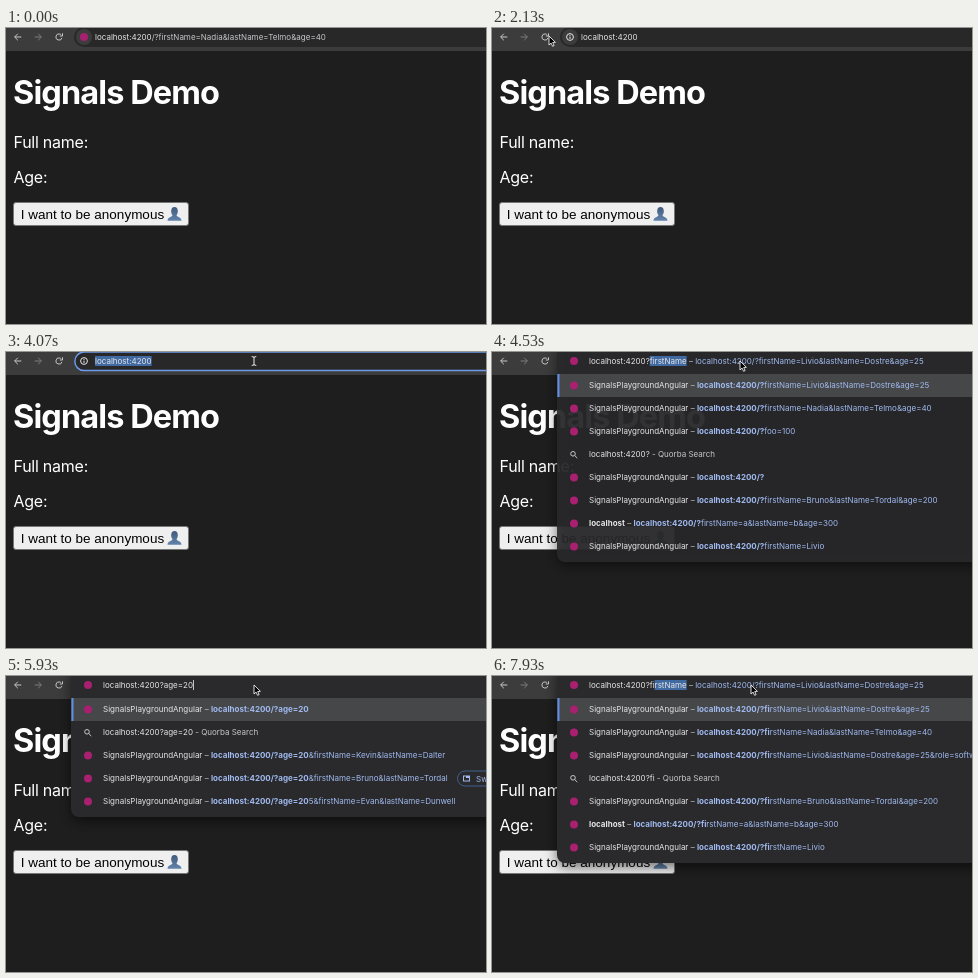
Animation, 480 px wide and 296 px high, one loop 8 s. Source, as an HTML page with a canvas:

```html
<!DOCTYPE html>
<html lang="en">
<head>
<meta charset="utf-8">
<title>Signals Demo</title>
<style>
html, body { margin: 0; width: 100%; height: 100%; overflow: hidden; background: #1e1e1e; }
canvas { display: block; width: 480px; height: 296px; }
</style>
</head>
<body>
<canvas id="stage"></canvas>
<script>
const W = 480, H = 296, LOOP = 8000, TICK = 200 / 3;
const canvas = document.getElementById('stage');
const ctx = canvas.getContext('2d');
const dpr = window.devicePixelRatio || 1;
canvas.width = W * dpr;
canvas.height = H * dpr;

const UI = 'Inter, "Open Sans", sans-serif';
const SMALL = '8px ' + UI, SMALL_BOLD = '700 8px ' + UI;
const WHITE = '#e6e6e6', DIM = '#c6c7c9', BLUE = '#a0baf0', ICON = '#c8c8c8', CARET = '#c4c4c4';
const BAR = '#3c3c3c', PILL = '#282829', POPUP = '#2a2a2c', SELECT = '#426aa2', LOGO = '#a8206f';

const HOST = 'localhost:4200';
const person = (first, last) => `firstName=${first}&lastName=${last}`;
const LIVIO = person('Livio', 'Dostre') + '&age=25';
const NADIA = person('Nadia', 'Telmo') + '&age=40';
const BRUNO = person('Bruno', 'Tordal');
const KEVIN = person('Kevin', 'Dalter');
const EVAN = person('Evan', 'Dunwell');
const AB = '@' + person('a', 'b') + '&age=300';

// Suggestion rows: "*" is a web search, "@" a page titled by its host, "!" an open tab
const ANY = [LIVIO, NADIA, 'foo=100', '*', '', BRUNO + '&age=200', AB, 'firstName=Livio'];
const FIRST = [LIVIO, NADIA, LIVIO + '&role=software', '*', BRUNO + '&age=200', AB, 'firstName=Livio'];
const AGE_A = ['age=20', '*', 'age=205&' + EVAN, 'age=20&' + KEVIN];
const AGE_B = ['age=20', '*', 'age=20&' + KEVIN, 'age=205&' + EVAN];
const AGE_20 = ['age=20', '*', 'age=20&' + KEVIN, '!age=20&' + BRUNO, 'age=205&' + EVAN];

// Address bar states: url with focus and selection, or typed query with suggestions
const STATES = [
  { t: 0, url: HOST + '/?' + NADIA, logo: true },
  { t: 1130, url: HOST + '/?' + NADIA, logo: true, focus: true, all: true },
  { t: 2130, url: HOST },
  { t: 3870, url: HOST, focus: true, all: true },
  { t: 4130, url: HOST, focus: true },
  { t: 4530, typed: '', rest: 'firstName', tail: LIVIO, rows: ANY, alpha: 0.9 },
  { t: 4600, typed: '', rest: 'firstName', tail: LIVIO, rows: ANY },
  { t: 4870, typed: 'a', rest: 'ge=20', rows: AGE_A },
  { t: 5000, typed: 'ag', rest: 'e=20', rows: AGE_A },
  { t: 5130, typed: 'age', rest: '=20', rows: AGE_A },
  { t: 5330, typed: 'age=', rest: '20', rows: AGE_A },
  { t: 5470, typed: 'age=', rest: '20', rows: AGE_B },
  { t: 5670, typed: 'age=2', rest: '0', rows: AGE_B },
  { t: 5870, typed: 'age=20', rest: '', rows: AGE_20 },
  { t: 6130, url: HOST, loading: true },
  { t: 6200, url: HOST },
  { t: 6730, url: HOST, focus: true, all: true },
  { t: 7000, url: HOST, focus: true },
  { t: 7470, typed: '', rest: 'firstName', tail: LIVIO, rows: ANY, alpha: 0.9 },
  { t: 7530, typed: '', rest: 'firstName', tail: LIVIO, rows: ANY },
  { t: 7670, typed: 'f', rest: 'irstName', tail: LIVIO, rows: FIRST },
  { t: 7800, typed: 'fi', rest: 'rstName', tail: LIVIO, rows: FIRST }
];

// Pointer path: time, x, y
const PATH = [
  [67, 344, 129], [200, 394, 161], [333, 394, 161], [600, 372, 178], [1000, 309, 9],
  [1200, 309, 9], [1400, 78, 23], [1600, 74, 20], [2067, 57, 8], [2467, 57, 8],
  [2733, 120, 55], [3000, 207, 19], [3133, 207, 19], [3200, 221, 20], [3267, 227, 20],
  [3400, 227, 20], [3667, 248, 9], [6800, 248, 9], [7133, 259, 9]
];

function pointerAt(t) {
  if (t < PATH[0][0] - 1) return null;
  const i = PATH.findIndex(p => p[0] > t);
  if (i < 1) return PATH[i < 0 ? PATH.length - 1 : 0].slice(1);
  const [t0, x0, y0] = PATH[i - 1], [t1, x1, y1] = PATH[i];
  const k = (t - t0) / (t1 - t0), e = k * k * (3 - 2 * k);
  return [x0 + (x1 - x0) * e, y0 + (y1 - y0) * e];
}

function text(str, x, y, color, font = SMALL, spacing = 0) {
  ctx.font = font;
  ctx.letterSpacing = spacing + 'px';
  ctx.fillStyle = color;
  ctx.fillText(str, x, y);
  return x + ctx.measureText(str).width;
}

function widthOf(str) {
  ctx.font = SMALL;
  ctx.letterSpacing = '0px';
  return ctx.measureText(str).width;
}

function rect(x, y, w, h, color) {
  ctx.fillStyle = color;
  ctx.fillRect(x, y, w, h);
}

function roundRect(x, y, w, h, r) {
  ctx.beginPath();
  ctx.roundRect(x, y, w, h, r);
}

function disc(x, y, r, color) {
  ctx.beginPath();
  ctx.arc(x, y, r, 0, Math.PI * 2);
  ctx.fillStyle = color;
  ctx.fill();
}

function line(points, color, width = 1) {
  ctx.beginPath();
  points.forEach(([x, y]) => ctx.lineTo(x, y));
  ctx.strokeStyle = color;
  ctx.lineWidth = width;
  ctx.stroke();
}

function ring(x, y, r, color, from = 0, to = Math.PI * 2) {
  ctx.beginPath();
  ctx.arc(x, y, r, from, to);
  ctx.strokeStyle = color;
  ctx.lineWidth = 1;
  ctx.stroke();
}

function drawCaret(x) {
  rect(Math.round(x), 4, 1, 10, CARET);
}

function drawPage() {
  rect(0, 0, W, H, '#1e1e1e');
  text('Signals Demo', 7, 76, '#fff', '700 32.5px ' + UI, -0.9);
  text('Full name:', 7.5, 120, '#fff', '16px ' + UI, -0.25);
  text('Age:', 7.5, 155, '#fff', '16px ' + UI, -0.25);

  roundRect(7.5, 174.5, 175, 23, 2.5);
  ctx.fillStyle = '#efefef';
  ctx.fill();
  ctx.strokeStyle = '#777';
  ctx.lineWidth = 1;
  ctx.stroke();
  text('I want to be anonymous', 14.8, 190.5, '#000', '13.5px "Liberation Sans", Arial, sans-serif');
  drawBust(168.5, 178.7);
}

function drawBust(x, y) {
  const fill = ctx.createLinearGradient(0, y, 0, y + 14);
  fill.addColorStop(0, '#40587a');
  fill.addColorStop(1, '#6384ad');
  ctx.fillStyle = fill;
  ctx.beginPath();
  ctx.ellipse(x, y + 4.6, 3.3, 4.3, 0, 0, Math.PI * 2);
  ctx.fill();
  ctx.beginPath();
  ctx.moveTo(x - 7, y + 14);
  ctx.bezierCurveTo(x - 7, y + 10, x - 2, y + 11, x - 1.7, y + 7.5);
  ctx.lineTo(x + 1.7, y + 7.5);
  ctx.bezierCurveTo(x + 2, y + 11, x + 7, y + 10, x + 7, y + 14);
  ctx.fill();
}

function drawArrowIcon(x, dir, color) {
  line([[x - 3.3 * dir, 9], [x + 3.3 * dir, 9]], color);
  line([[x + 0.2 * dir, 5.8], [x + 3.4 * dir, 9], [x + 0.2 * dir, 12.2]], color);
}

function drawReload(hover, loading) {
  if (hover) disc(53, 9, 9, '#505050');
  if (loading) {
    line([[50, 6], [56, 12]], ICON);
    line([[56, 6], [50, 12]], ICON);
    return;
  }
  ring(53, 9, 3.1, ICON, 0.3, Math.PI * 2 - 0.8);
  line([[56.5, 5.3], [56.5, 8], [53.8, 8]], ICON);
}

function drawToolbar(s, hover) {
  rect(0, 0, W, 23, BAR);
  drawArrowIcon(12, -1, ICON);
  drawArrowIcon(32, 1, '#7c7c7c');
  drawReload(hover, s.loading);
}

function drawAddress(s) {
  roundRect(68, -1, 440, 20, 10);
  ctx.fillStyle = PILL;
  ctx.fill();
  if (s.focus) {
    roundRect(68.8, 0, 440, 18.6, 9.3);
    ctx.strokeStyle = '#6c9bea';
    ctx.lineWidth = 1.5;
    ctx.stroke();
  } else {
    disc(78, 9, 8, BAR);
  }
  if (s.logo) disc(78, 9, 4, LOGO);
  else {
    ring(78, 9, 3.4, WHITE);
    rect(77.5, 8.6, 1, 2.4, WHITE);
    rect(77.5, 6.9, 1, 1, WHITE);
  }
  if (s.all) rect(89, 4, widthOf(s.url), 10, SELECT);
  const x = text(HOST, 89, 12, WHITE);
  const end = text(s.url.slice(HOST.length), x, 12, s.focus ? WHITE : DIM);
  if (s.focus && !s.all) drawCaret(end);
}

function drawSearchIcon(y) {
  ring(81, y - 0.7, 2.3, DIM);
  line([[82.7, y + 1], [85.3, y + 3.6]], DIM);
}

function drawTabButton(y) {
  roundRect(451.5, y - 7.5, 60, 15, 7.5);
  ctx.strokeStyle = '#41608f';
  ctx.lineWidth = 1;
  ctx.stroke();
  ctx.strokeStyle = BLUE;
  ctx.strokeRect(457.5, y - 2.5, 6, 5);
  rect(460, y - 2.5, 3.5, 2, BLUE);
  text('Switch to this tab', 470, y + 3, BLUE);
}

function drawRow(row, i, typed) {
  const y = 33.5 + 23 * i, base = y + 2.9;
  if (row === '*') {
    drawSearchIcon(y);
    const x = text(HOST + '?' + typed, 97, base, WHITE);
    text(' - Quorba Search', x, base, DIM);
    return;
  }
  disc(82, y, 4, LOGO);
  const byHost = row[0] === '@', tab = row[0] === '!';
  const query = byHost || tab ? row.slice(1) : row;
  let x = byHost
    ? text('localhost', 97, base, WHITE, SMALL_BOLD)
    : text('SignalsPlaygroundAngular', 97, base, WHITE);
  x = text(' – ', x, base, DIM);
  const match = query.startsWith(typed) ? typed.length : 0;
  x = text(HOST + '/?' + query.slice(0, match), x, base, BLUE, SMALL_BOLD);
  text(query.slice(match), x, base, BLUE);
  if (tab) drawTabButton(y);
}

function drawSuggestions(s) {
  const bottom = 26 + 23 * s.rows.length;
  ctx.save();
  ctx.globalAlpha = s.alpha || 1;
  ctx.shadowColor = 'rgba(0,0,0,.55)';
  ctx.shadowBlur = 13 * dpr;
  ctx.shadowOffsetY = 4 * dpr;
  roundRect(65, -10, 440, bottom + 10, 8);
  ctx.fillStyle = POPUP;
  ctx.fill();
  ctx.restore();

  rect(65, 22, W - 65, 23, '#464749');
  rect(65.5, 22, 2, 23, '#5f8fe4');
  disc(82, 9, 4, LOGO);
  let x = text(HOST + '?' + s.typed, 97, 12, WHITE);
  if (s.rest) {
    rect(x, 4, widthOf(s.rest), 10, SELECT);
    x = text(s.rest, x, 12, WHITE);
  } else {
    drawCaret(x);
  }
  if (s.tail) {
    x = text(' – ', x, 12, DIM);
    text(HOST + '/?' + s.tail, x, 12, BLUE);
  }
  s.rows.forEach((row, i) => drawRow(row, i, s.typed));
}

function drawPointer(x, y, beam) {
  ctx.save();
  ctx.translate(x, y);
  if (beam) {
    [['#222', 2.2], ['#f2f2f2', 1]].forEach(([color, width]) => {
      line([[-2.3, -4.5], [0, -3.8], [2.3, -4.5]], color, width);
      line([[0, -4], [0, 4]], color, width);
      line([[-2.3, 4.5], [0, 3.8], [2.3, 4.5]], color, width);
    });
  } else {
    const shape = [[0, 0], [0, 9], [2.1, 7.1], [3.6, 10.3], [5.1, 9.6], [3.7, 6.5], [6.4, 6.3]];
    ctx.beginPath();
    shape.forEach(p => ctx.lineTo(...p));
    ctx.closePath();
    ctx.fillStyle = '#000';
    ctx.fill();
    ctx.strokeStyle = '#f0f0f0';
    ctx.lineWidth = 0.9;
    ctx.lineJoin = 'round';
    ctx.stroke();
  }
  ctx.restore();
}

function draw(time) {
  // The screen refreshes fifteen times a second
  const t = Math.floor((time % LOOP + 4) / TICK) * TICK;
  const s = STATES.filter(state => state.t <= t + 5).pop();
  const pointer = pointerAt(t);
  ctx.setTransform(dpr, 0, 0, dpr, 0, 0);
  drawPage();
  drawToolbar(s, t > 1850 && t < 2130);
  if (s.rows) drawSuggestions(s);
  else drawAddress(s);
  if (pointer) {
    const [x, y] = pointer;
    drawPointer(x, y, !s.rows && x > 88 && y < 17);
  }
}

const start = performance.now();
function loop() {
  draw(performance.now() - start);
  requestAnimationFrame(loop);
}
loop();
</script>
</body>
</html>
```
